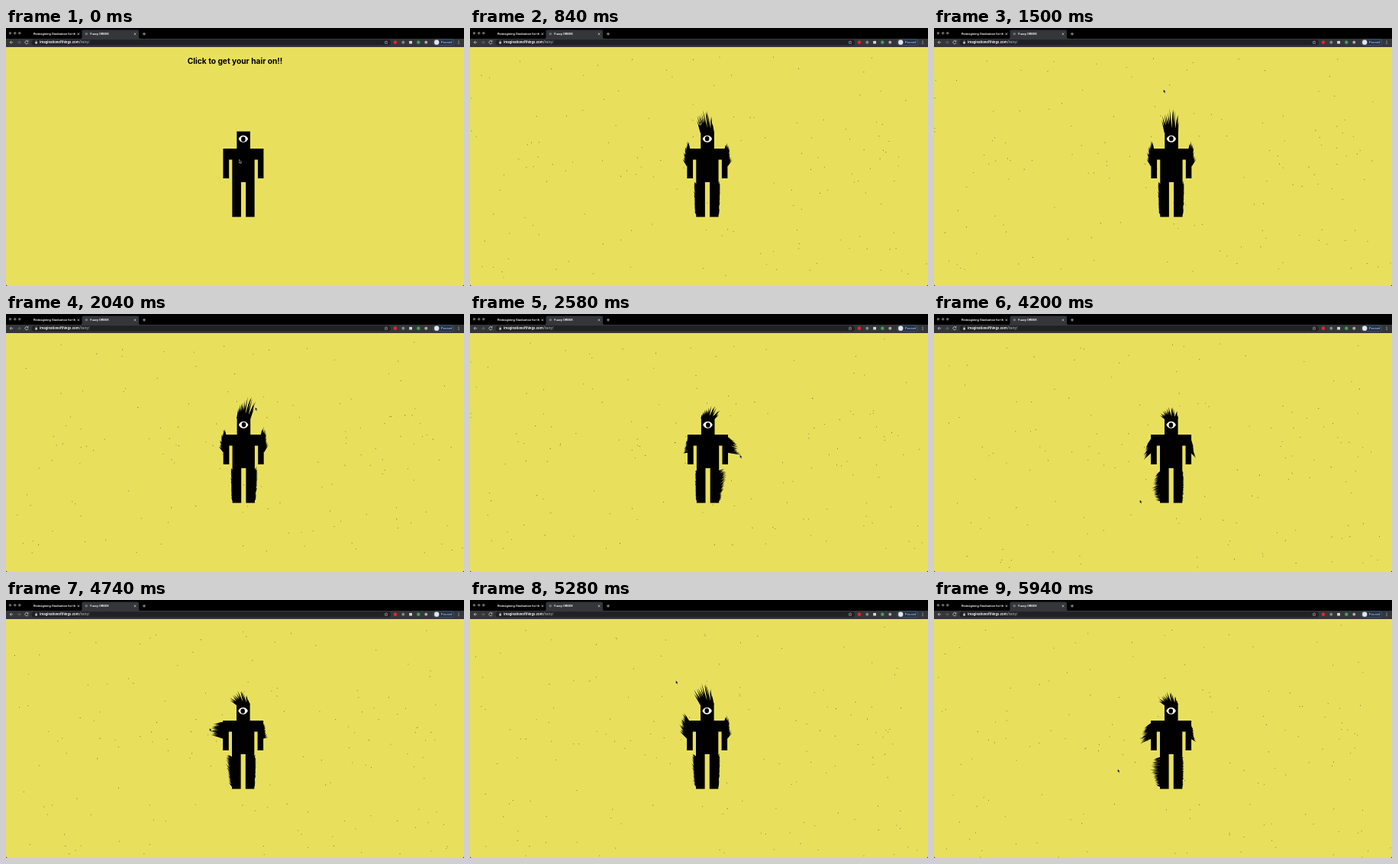
An HTML page for the animation above (6 s loop, 600x338 px).

```html
<!DOCTYPE html>
<html lang="en">
<head>
<meta charset="utf-8">
<title>Hair on</title>
<style>
  html, body { margin: 0; width: 100%; height: 100%; overflow: hidden; background: #e8e05d; }
  svg { display: block; width: 100vw; height: 100vh; }
  text { font-family: Roboto, sans-serif; font-weight: 500; }
  .tab { font-size: 4.1px; fill: #fff; }
  .url { font-size: 4.6px; fill: #fff; }
  .line { fill: none; stroke: #d4d5d8; stroke-width: .7; }
  .title { font: 700 10.2px Inter, sans-serif; text-anchor: middle; }
</style>
</head>
<body>
<svg viewBox="0 0 600 338" preserveAspectRatio="none">
  <rect width="600" height="338" fill="#000"/>
  <path d="M0 24H600V336a2 2 0 0 1-2 2H2a2 2 0 0 1-2-2z" fill="#e8e05d"/>

  <!-- tab strip -->
  <g fill="#65666a">
    <circle cx="5.5" cy="6.7" r="1.8"/><circle cx="11.7" cy="6.7" r="1.8"/><circle cx="17.8" cy="6.7" r="1.8"/>
  </g>
  <path d="M0 14H98Q99.5 14 99.5 12V4.5Q99.5 2.5 101.5 2.5H172Q174 2.5 174 4.5V12Q174 14 175.5 14H600V25H0z" fill="#35363a"/>
  <text class="tab" x="36" y="9.2">Reimagining Graduation for th</text>
  <circle cx="105.3" cy="7.8" r="1.8" fill="#707175"/>
  <text class="tab" x="110.3" y="9.2">Fuzzy ORBEK</text>
  <path class="line" d="M93.6 6.5l2.6 2.6m0-2.6l-2.6 2.6M167.7 6.5l2.6 2.6m0-2.6l-2.6 2.6M179 7.8h4m-2-2v4"/>

  <!-- toolbar -->
  <path class="line" d="M9.3 18.8H5.2m1.9-2l-2 2 2 2"/>
  <path class="line" d="M14.8 18.8h4.1m-1.9-2l2 2-2 2" style="stroke:#77787c"/>
  <path class="line" d="M28.7 17.5a2.1 2.1 0 1 0 .3 1.8M29 16.3v1.6h-1.6"/>
  <rect x="33.5" y="15.2" width="470.5" height="7.4" rx="3.7" fill="#202124"/>
  <rect x="38.2" y="18.3" width="2.8" height="2.3" fill="#c9cacd"/>
  <path class="line" d="M38.8 18.3v-.7a.8.8 0 0 1 1.6 0v.7" style="stroke-width:.5"/>
  <text class="url" x="44" y="20.4">imaginationofthings.com<tspan fill="#9aa0a6">/hairy/</tspan></text>
  <path class="line" d="M498 16.7l.6 1.4 1.5.1-1.1 1 .3 1.5-1.3-.8-1.3.8.3-1.5-1.1-1 1.5-.1z" style="stroke-width:.45"/>
  <circle cx="510" cy="18.8" r="2.2" fill="#dc2b2b"/>
  <circle cx="520.3" cy="18.8" r="2" fill="#85878b"/>
  <rect x="528.2" y="17" width="3.8" height="3.6" fill="#d5d6d8"/>
  <circle cx="540.3" cy="18.8" r="2.2" fill="#34a853"/>
  <circle cx="550.3" cy="18.8" r="2" fill="#a9abae"/>
  <rect x="559.5" y="14.9" width="27.5" height="7.8" rx="3.9" fill="#29323f" stroke="#47709f" stroke-width=".5"/>
  <circle cx="564.2" cy="18.8" r="3.2" fill="#e4e4e2"/>
  <text x="569.8" y="20.4" font-size="4.4" fill="#8ab4f8">Paused</text>
  <g fill="#d4d5d8">
    <circle cx="593" cy="17" r=".55"/><circle cx="593" cy="18.8" r=".55"/><circle cx="593" cy="20.6" r=".55"/>
  </g>

  <!-- page -->
  <text class="title" id="title" x="300" y="46.8">Click to get your hair on!!</text>
  <path id="dots" fill="none" stroke="#77722f" stroke-width="1.1" stroke-linecap="round"/>
  <g id="figure">
    <path d="M302.4 135.5H320V158H337.5V197H330V172.5H325.7V247.5H314.2V202H308V247.5H296.4V172.5H292.2V197H284.5V158H302.4z"/>
    <path id="hair"/>
    <path d="M304.7 145.3C306.2 142.2 308.4 140.8 311 140.8S315.8 142.2 317.3 145.3C315.800 148.4 313.6 149.8 311 149.8S306.2 148.4 304.7 145.3z" fill="#fff"/>
    <ellipse id="pupil" cx="311" cy="145.3" rx="2.8" ry="3.3"/>
  </g>
  <path id="cursor" d="M0 0V4.7L1.1 3.7 1.9 5.5 2.7 5.1 1.9 3.4H3.4z" fill="#000" stroke="#fff" stroke-width=".4"/>
</svg>
<script>
const LOOP = 6000, STEP = 60, CLICK = 240;
const $ = id => document.getElementById(id);
const title = $('title'), dotsPath = $('dots'), figure = $('figure'),
      hairPath = $('hair'), pupil = $('pupil'), cursor = $('cursor');

let seed = 11;
const rnd = () => {
  seed = (seed * 1664525 + 1013904223) >>> 0;
  return seed / 4294967296;
};

// time, x, y of the pointer
const trail = [
  [0, 306, 174], [300, 306, 173], [1500, 301, 82], [2580, 354, 186],
  [3300, 347, 231], [4200, 270, 245], [5280, 270, 107], [5940, 241, 223]
];
// time, left and bottom edge of the speck field
const field = [
  [0, 3, 332], [1500, 1, 320], [2580, 1, 307], [3300, 30, 311],
  [4200, 19, 333], [5280, 5, 335], [5940, 4, 337]
];

// Smooth curve through keys that are unevenly spaced in time
function sample(keys, t) {
  let i = 0;
  while (i < keys.length - 2 && t >= keys[i + 1][0]) i++;
  const a = keys[i], b = keys[i + 1], span = b[0] - a[0], u = (t - a[0]) / span;
  const slope = (k, c) => {
    const p = keys[k - 1], n = keys[k + 1];
    return p && n ? (n[c] - p[c]) / (n[0] - p[0]) * span : 0;
  };
  return [1, 2].map(c => {
    const d = b[c] - a[c], m0 = slope(i, c), m1 = slope(i + 1, c);
    return a[c] + u * (m0 + u * (3 * d - 2 * m0 - m1 + u * (m0 + m1 - 2 * d)));
  });
}

// out: growth along the normal, pull: bend to the pointer,
// keep: share of the growth that always stays outside, side: -1 left, 1 right
const hairs = [];
function addHair(x, y, nx, ny, out, pull, w, side = 0, keep = 0) {
  const l = Math.hypot(nx, ny), k = .62 + .38 * rnd();
  hairs.push({ x, y, nx: nx / l, ny: ny / l, out: out * k, pull: pull * k, w, side, keep });
}
function growHead(count) {
  for (let i = 0; i < count; i++) {
    const v = (i + rnd() * .6) / count, bulge = .6 + .4 * Math.sin(Math.PI * v);
    addHair(303 + 16.4 * v, 137, (v - .5) * .8 + (rnd() - .5) * .3, -1, 24 * bulge, 8.5, 1.3);
  }
}
function growSide(side) {
  const at = d => 311 + side * d;
  for (let i = 0; i < 22; i++) {
    const v = (i + rnd() * .6) / 22;
    addHair(at(23 + 3 * Math.min(1, v * 3)), 160 + 21 * v, side * (.6 + .4 * v),
      -.6 + .75 * v, 5.5 + 4 * v, 11.5, 1.1, side, .3 + .5 * v);
  }
  for (let i = 0; i < 30; i++) {
    const v = (i + rnd() * .6) / 30, bulge = .4 + .6 * Math.sin(Math.PI * Math.min(1, v + .12));
    addHair(at(13.8), 206 + 39 * v, side, -.1, 3 + 1.8 * bulge, 10 * bulge, 1, side, .7);
  }
}
growHead(18);
growSide(-1);
growSide(1);

const specks = Array.from({ length: 145 }, () => ({
  u: rnd(), v: rnd(), p: rnd() * 6.28, q: rnd() * 6.28, amp: 6 + 16 * rnd()
}));

const f = n => n.toFixed(2);
const clamp = (n, lo, hi) => Math.min(hi, Math.max(lo, n));

function hairShape(h, mx, my) {
  const dx = mx - h.x, dy = my - h.y, d = Math.hypot(dx, dy) || 1;
  let vx = h.nx * h.out + dx / d * h.pull;
  const vy = h.ny * h.out + dy / d * h.pull;
  if (h.side) vx = h.side * Math.max(h.side * vx, h.out * h.keep);
  const l = Math.hypot(vx, vy) || 1, px = -vy / l * h.w, py = vx / l * h.w;
  return `M${f(h.x + px)} ${f(h.y + py)}L${f(h.x + vx)} ${f(h.y + vy)}L${f(h.x - px)} ${f(h.y - py)}z`;
}

function speckShape(s, t, left, bottom) {
  const w = t / LOOP * 6.28;
  const x = left + s.u * (598 - left) + s.amp * Math.sin(w + s.p);
  const y = 30 + s.v * (bottom - 30) + s.amp * .3 * Math.sin(w * 2 + s.q);
  return `M${f(clamp(x, left, 598))} ${f(clamp(y, 29, bottom))}h.01`;
}

function draw(t) {
  const [mx, my] = sample(trail, t), hairy = t >= CLICK;
  title.style.visibility = hairy ? 'hidden' : 'visible';
  cursor.setAttribute('transform', `translate(${f(mx - .5)} ${f(my - 1.7)})`);
  figure.setAttribute('transform', `translate(${f(clamp((mx - 311) * .012, -.4, .5))} 0)`);
  const dx = mx - 311, dy = my - 145, d = Math.hypot(dx, dy) || 1;
  pupil.setAttribute('cx', f(311 + dx / d * .5));
  pupil.setAttribute('cy', f(145.3 + dy / d * .35));
  const [left, bottom] = sample(field, t);
  hairPath.setAttribute('d', hairy ? hairs.map(h => hairShape(h, mx, my)).join('') : '');
  dotsPath.setAttribute('d', hairy ? specks.map(s => speckShape(s, t, left, bottom)).join('') : '');
}

const start = performance.now();
function tick() {
  const t = (performance.now() - start) % LOOP;
  draw(Math.floor(t / STEP) * STEP);
  requestAnimationFrame(tick);
}
tick();
</script>
</body>
</html>
```
